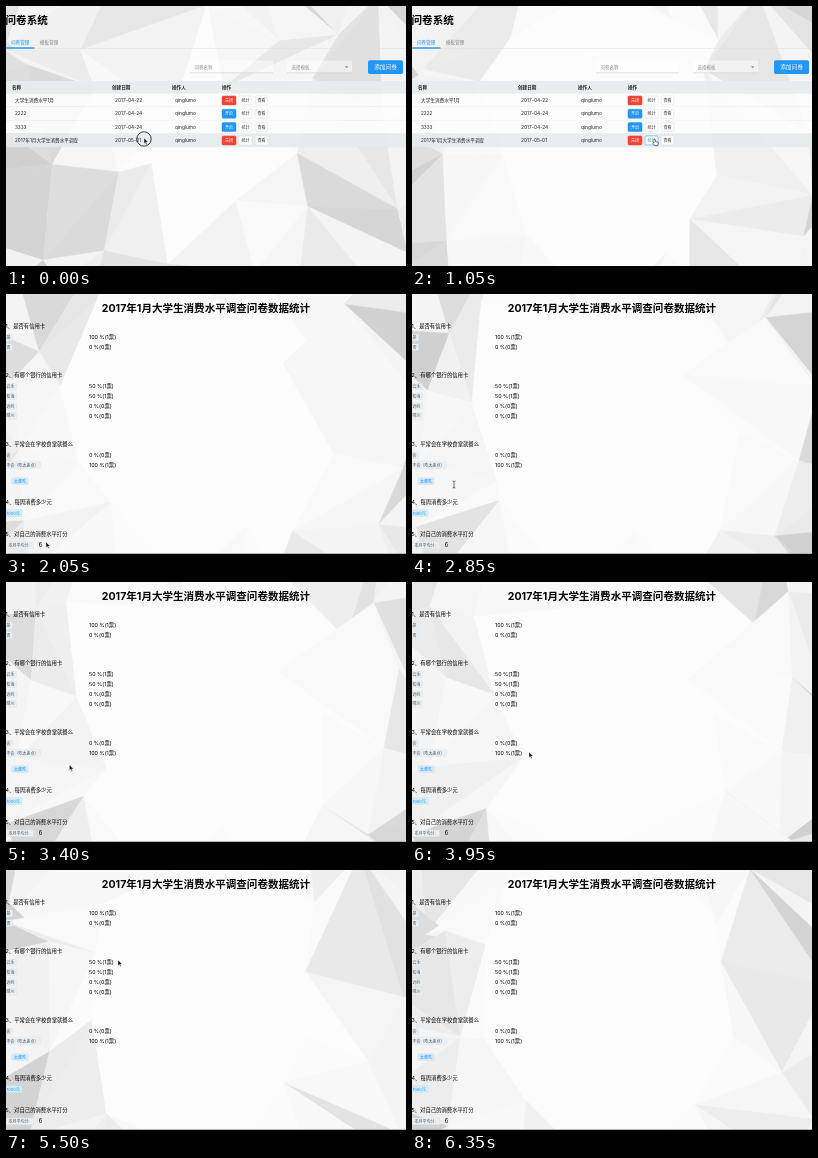
These frames come from a looping animation (400 by 260 pixels, 6400 ms). An HTML page:

```html
<!DOCTYPE html>
<html lang="zh-CN">
<head>
<meta charset="utf-8">
<style>
html, body { margin: 0; width: 100%; height: 100%; overflow: hidden; background: #fcfcfc; }
svg { display: block; width: 400px; height: 260px; }
text { font-family: Inter, "Noto Sans CJK SC", "Noto Sans CJK", sans-serif; white-space: pre; }
</style>
</head>
<body>
<svg viewBox="0 0 400 260">
  <g id="mesh" stroke-width=".5"></g>
  <g id="list"></g>
  <g id="stats"></g>
  <g id="pointer">
    <circle id="ring" cy="-1" r="7.2" fill="none" stroke="#222" stroke-width=".9"/>
    <path id="arrow" d="M0 -2V3.6L1.3 2.4L2.2 4.4L3.1 4L2.2 2.1H4Z" fill="#111" stroke="#fff" stroke-width=".4"/>
    <path id="hand" d="M-1 -2.5Q0 -3.3 .5 -2.3V-.5L3 .2Q3.6 .6 3.2 2L2.6 3.7H-.4L-2.3 1Q-2 .2 -1 .8Z" fill="#fff" stroke="#222" stroke-width=".6"/>
    <path id="beam" d="M-1.4 -3Q0 -3 0 -2Q0 -3 1.4 -3M0 -2V3M-1.4 4Q0 4 0 3Q0 4 1.4 4" fill="none" stroke="#333" stroke-width=".7"/>
  </g>
</svg>
<script>
const LOOP = 6400, STEP = 50, PAGE_TURN = 1400, HOVER = 900, SECOND_RING = 4550;
const BLUE = '#2196f3', RED = '#f44336', INK = '#222', RULE = '#d8dcde';
const byId = id => document.getElementById(id);
const mesh = byId('mesh'), list = byId('list'), stats = byId('stats');

function add(parent, tag, attrs, content) {
  const el = document.createElementNS('http://www.w3.org/2000/svg', tag);
  for (const k in attrs) el.setAttribute(k, attrs[k]);
  if (content !== undefined) el.textContent = content;
  parent.appendChild(el);
  return el;
}
const label = (g, x, y, str, size, fill = INK, more = {}) =>
  add(g, 'text', { x, y, 'font-size': size, fill, ...more }, str);
const box = (g, x, y, width, height, fill, more = {}) =>
  add(g, 'rect', { x, y, width, height, fill, ...more });
const middle = { 'text-anchor': 'middle' };

// Background: a jittered triangle mesh, bright in the middle
let seed = 29;
function rand() {
  seed = (seed * 16807) % 2147483647;
  return seed / 2147483647;
}
const COLS = 8, ROWS = 6, CELL = 70;
const points = Array.from({ length: COLS * ROWS }, (_, i) => ({
  x: (i % COLS) * CELL - 45 + (rand() - .5) * 45,
  y: Math.floor(i / COLS) * CELL - 45 + (rand() - .5) * 45,
  phase: rand() * 2 * Math.PI,
  speed: .0008 + rand() * .0007
}));
const facets = [];
function facet(...corners) {
  facets.push({ corners, phase: rand() * 2 * Math.PI, speed: .0006 + rand() * .0008,
    el: add(mesh, 'polygon', {}) });
}
for (let r = 0; r < ROWS - 1; r++) {
  for (let c = 0; c < COLS - 1; c++) {
    const a = r * COLS + c, b = a + 1, d = a + COLS, e = d + 1;
    if (rand() < .5) { facet(a, b, d); facet(b, e, d); }
    else { facet(a, b, e); facet(a, e, d); }
  }
}
const clamp = v => Math.min(1, Math.max(0, v));

function drawMesh(t) {
  const at = points.map(p => [
    p.x + 20 * Math.sin(p.phase + t * p.speed),
    p.y + 20 * Math.cos(p.phase + t * p.speed)
  ]);
  const rim = .6 - .3 * Math.exp(-t / 600);
  for (const f of facets) {
    const corners = f.corners.map(i => at[i]);
    const mean = k => corners.reduce((sum, p) => sum + p[k], 0) / 3;
    const edge = clamp((Math.hypot((mean(0) - 200) / 200, (mean(1) - 130) / 260) - rim) / .4);
    const shade = .5 + .5 * Math.sin(f.phase + t * f.speed);
    const grey = Math.round(252 - edge * (8 + 36 * shade ** 3));
    const tone = `rgb(${grey},${grey},${grey})`;
    f.el.setAttribute('points', corners.map(p => p.map(v => v.toFixed(2))).join(' '));
    f.el.setAttribute('fill', tone);
    f.el.setAttribute('stroke', tone);
  }
}

// Survey list page
label(list, -.5, 17.5, '问卷系统', 10.6, '#000', { 'font-weight': 700 });
label(list, 5, 37.5, '问卷管理', 4.6, BLUE);
label(list, 34, 37.5, '模板管理', 4.6, '#888');
box(list, 0, 42.4, 400, .5, RULE);
box(list, 0, 41.3, 28.5, 1.4, BLUE);
function field(x, w, str) {
  box(list, x, 54.5, w, 12.5, '#fff', { 'fill-opacity': .45 });
  box(list, x, 66.6, w, .6, '#c4cacd');
  label(list, x + 4.5, 62.7, str, 4.5, '#909090');
}
field(184, 83, '问卷名称');
field(281, 65, '选择模板');
add(list, 'path', { d: 'M339 60.2h3.4l-1.7 2z', fill: '#888' });
box(list, 362, 54.3, 35, 13.6, BLUE, { rx: 1.6 });
label(list, 379.5, 63.3, '添加问卷', 5.7, '#fff', { ...middle, 'font-weight': 500 });

box(list, 0, 75, 400, 12.7, '#e7edef', { 'fill-opacity': .95 });
[[6, '名称'], [106, '创建日期'], [166, '操作人'], [216, '操作']]
  .forEach(([x, str]) => label(list, x, 83, str, 4.6, INK, { 'font-weight': 600 }));

function button(x, y, w, str, fill = '#fff', ink = '#333', stroke = RULE) {
  const frame = box(list, x, y, w, 9, fill, { rx: 1.2, stroke, 'stroke-width': .5 });
  const words = label(list, x + w / 2, y + 6, str, 4.1, ink, middle);
  return { frame, words };
}
let target;
[['大学生消费水平1月', '2017-04-22', false], ['2222', '2017-04-24', true],
 ['3333', '2017-04-24', true], ['2017年1月大学生消费水平调查', '2017-05-01', false]]
  .forEach(([name, date, closed], i) => {
    const y = 96 + i * 13.35, tone = closed ? BLUE : RED;
    box(list, 0, y - 8.3, 400, 13.1, i === 3 ? '#e5ecee' : '#fdfdfd', { 'fill-opacity': .9 });
    box(list, 0, y + 4.8, 400, .4, '#dde1e3');
    label(list, 9, y, name, 4.65);
    label(list, 109, y, date, 4.85);
    label(list, 169, y, 'qinglumo', 4.8);
    button(216, y - 6.1, 14, closed ? '开启' : '关闭', tone, '#fff', tone);
    target = button(233, y - 6.1, 13, '统计');
    button(249.3, y - 6.1, 12.5, '查看');
  });

// Statistics page
label(stats, 200, 18, '2017年1月大学生消费水平调查问卷数据统计', 10.55, '#000',
  { ...middle, 'font-weight': 700 });
const question = (y, str) => label(stats, -.4, y, str, 5.35, '#000');
function chip(x, y, w, str, lit) {
  box(stats, x, y - 3.2, w, 6.6, lit ? '#d3eafb' : '#e9eff3',
    { rx: .8, stroke: lit ? '#bfe0f8' : '#dbe4e9', 'stroke-width': .4 });
  label(stats, x + w / 2, y + 1.5, str, 4, lit ? BLUE : '#555', middle);
}
function options(y, names, votes) {
  const total = votes.reduce((a, b) => a + b);
  names.forEach((name, i) => {
    const line = y + i * 9.8, w = name.length * 4 + 4;
    chip(-1.5, line, w, name);
    label(stats, 83, line + 1.9, `${votes[i] / total * 100} %(${votes[i]}票)`, 5.35, '#000');
  });
}
question(34, '1、是否有信用卡');
options(43.3, ['是', '否'], [1, 0]);
question(83, '2、有哪个银行的信用卡');
options(92.4, ['云禾', '松海', '远岭', '晴川'], [1, 1, 0, 0]);
question(152, '3、平常会在学校食堂就餐么');
options(161.2, ['会', '不会（吃太差点）'], [0, 1]);
chip(6, 187, 16, '太难吃', true);
question(210, '4、每周消费多少元');
chip(-1.5, 219, 17.5, '1000元', true);
question(242, '5、对自己的消费水平打分');
chip(-1.5, 251.2, 29, '本月平均分:');
label(stats, 32.7, 253.3, '6', 5.6, '#000');
box(stats, 0, 259.2, 400, .8, '#a5a5a5');

// Pointer moves: start, end, x, y
const moves = [[200, 950, 243, 136], [1450, 2050, 40, 250], [2350, 2850, 42, 190],
  [3100, 3950, 117, 172], [4200, 4700, 112, 92]];
const show = (el, on) => el.setAttribute('visibility', on ? 'visible' : 'hidden');

function drawPointer(t) {
  let x = 138, y = 134;
  for (const [from, to, toX, toY] of moves) {
    const p = clamp((t - from) / (to - from)), eased = p * p * (3 - 2 * p);
    x += (toX - x) * eased;
    y += (toY - y) * eased;
  }
  byId('pointer').setAttribute('transform', `translate(${x.toFixed(2)} ${y.toFixed(2)})`);
  const hover = t >= HOVER && t < PAGE_TURN, beam = t >= 2600 && t < 3150;
  target.frame.setAttribute('stroke', hover ? BLUE : RULE);
  target.words.setAttribute('fill', hover ? BLUE : '#333');
  show(byId('hand'), hover);
  show(byId('beam'), beam);
  show(byId('arrow'), !hover && !beam && t < 5900);
  const age = t < SECOND_RING ? t : t - SECOND_RING;
  show(byId('ring'), age < 400);
  byId('ring').setAttribute('opacity', clamp(1 - age / 900));
}

function draw(t) {
  drawMesh(t);
  drawPointer(t);
  list.style.display = t < PAGE_TURN ? '' : 'none';
  stats.style.display = t < PAGE_TURN ? 'none' : '';
}

const start = performance.now();
function tick(now) {
  const t = Math.max(0, now - start) % LOOP;
  draw(Math.floor(t / STEP) * STEP);
  requestAnimationFrame(tick);
}
draw(0);
requestAnimationFrame(tick);
</script>
</body>
</html>
```
